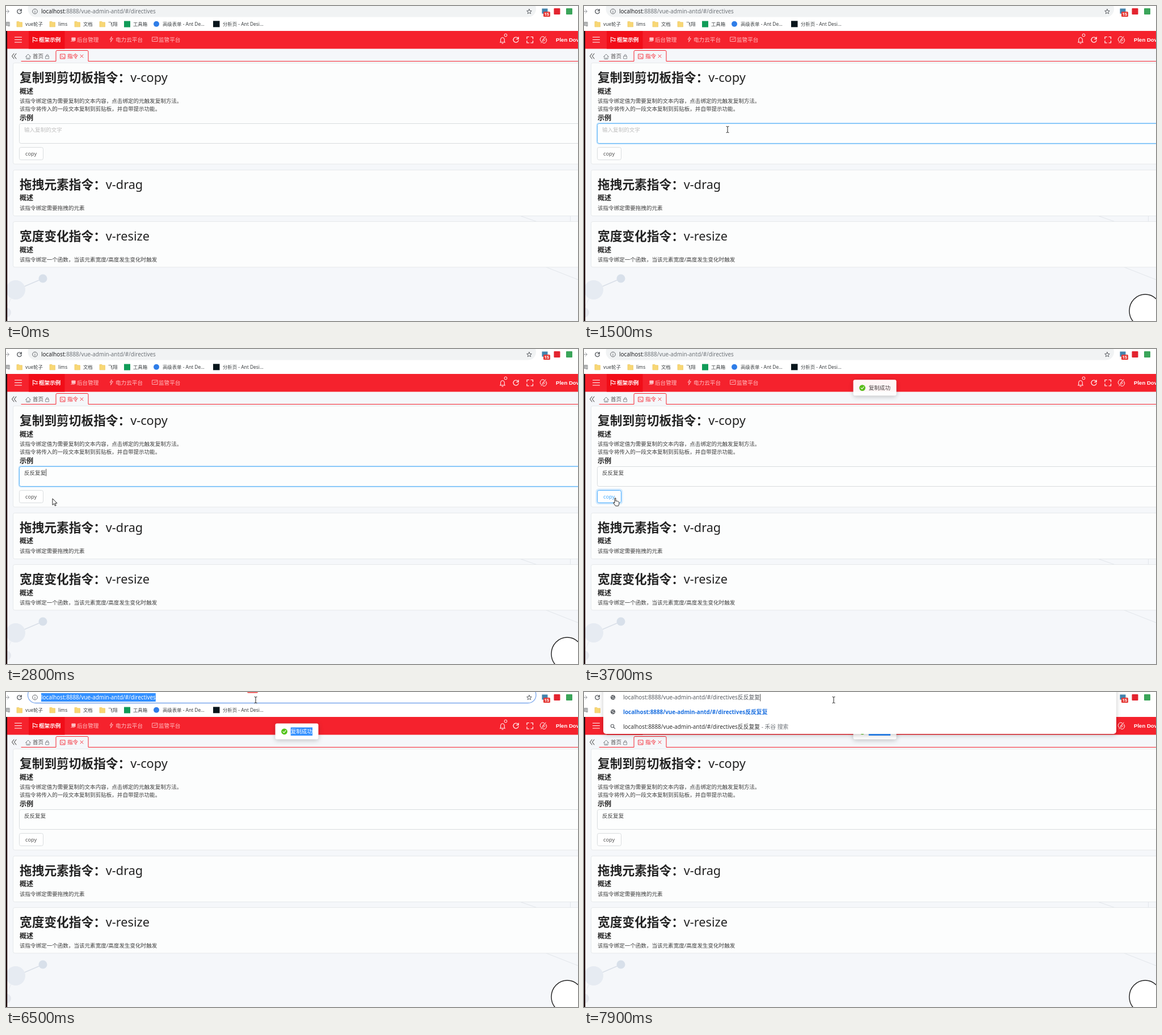
An HTML page for the animation above (8 s loop, 1008 by 556 pixels).

```html
<!DOCTYPE html>
<html lang="zh-CN">
<head>
<meta charset="utf-8">
<title>v-copy</title>
<style>
html, body { margin: 0; width: 100%; height: 100%; overflow: hidden; background: #fff; }
svg { display: block; width: 1008px; height: 556px; }
text { font-family: "Noto Sans", "Noto Sans CJK SC", "Noto Sans CJK", sans-serif; white-space: pre; }
.line { fill: none; stroke-linecap: round; stroke-linejoin: round; }
</style>
</head>
<body>
<svg id="stage" viewBox="0 0 1008 556" xmlns="http://www.w3.org/2000/svg"></svg>
<script>
const LOOP = 8000, STEP = 100;
const WORD = '反反复复', DONE = '复制成功', PATH = ':8888/vue-admin-antd/#/directives';
const BLUE = '#3390ff', RED = '#f5222d';

// Markup helpers; text is placed by its left edge and vertical middle.
const text = (x, cy, size, fill, str, more = '') =>
  `<text x="${x}" y="${cy + size * 0.37}" font-size="${size}" fill="${fill}" ${more}>${str}</text>`;
const rect = (x, y, w, h, fill, more = '') =>
  `<rect x="${x}" y="${y}" width="${w}" height="${h}" fill="${fill}" ${more}/>`;
const disc = (x, y, r, fill, more = '') => `<circle cx="${x}" cy="${y}" r="${r}" fill="${fill}" ${more}/>`;
const line = (d, color, w = 1, more = '') =>
  `<path class="line" d="${d}" stroke="${color}" stroke-width="${w}" ${more}/>`;
const group = (id, body) => `<g id="${id}">${body}</g>`;
const reload = (x, y, r, color, w) =>
  line(`M${x + r * 0.8} ${y - r * 0.6}A${r} ${r} 0 1 0 ${x + r} ${y + 1}M${x + r} ${y - r}v${r * 0.75}h${-r * 0.75}`, color, w);
const globe = (x, y) => disc(x, y, 4.2, '#5f6368') +
  line(`M${x - 2.5} ${y - 1.5}l2 1 1.5-2M${x - 1} ${y + 2.5}l1.5-1.5 2 .3`, '#fff', 1);

function browser() {
  const folder = x => `<path d="M${x} 27.5h4l1 1.3h4.5v8h-9.5z" fill="#f8d775" stroke="#e9c052" stroke-width=".6"/>`;
  const mark = (x, str) => text(x, 32, 8.4, '#3c4043', str);
  return rect(0, 0, 1008, 44, '#fff') +
    line('M0 9.5h5M2.5 6.5l3 3-3 3', '#9a9da1') + reload(23.5, 9.5, 3.8, '#5f6368', 1.4) +
    rect(38.5, -9, 895.5, 28.5, '#f1f3f4', 'rx="14" id="pill"') +
    group('address',
      disc(51, 9.5, 4.3, 'none', 'stroke="#5f6368"') + line('M51 9.3v2.3M51 7.3v.1', '#5f6368') +
      rect(62, 2, 203, 15, BLUE, 'id="urlMark"') +
      text(62, 9.5, 9.85, '#202124', `localhost<tspan id="urlPath" fill="#70757a">${PATH}</tspan>`, 'id="url"') +
      line('M266 4v12', '#222', 0.8, 'id="urlCaret"') +
      line('M922 5.5l1.2 2.9 3.1.2-2.4 2 .8 3-2.7-1.7-2.7 1.7.8-3-2.4-2 3.1-.2z', '#5f6368')) +
    rect(944.5, 4.5, 10, 9, '#4384ad') + rect(947, 10, 12, 9, '#e53935', 'rx="1.5"') +
    text(948.6, 14.6, 7.5, '#fff', '15', 'font-weight="600"') +
    rect(965.5, 4, 11, 11, '#e3242f', 'rx="1"') + rect(987, 4, 11, 11, '#3ba55a', 'rx="1"') +
    mark(-1, '用') + [19, 77, 121, 165].map(folder).join('') +
    mark(34, 'vue轮子') + mark(92, 'lims') + mark(136, '文档') + mark(180, '飞翔') +
    rect(208, 26.5, 11, 11, '#109c58') + mark(224, '工具箱') +
    disc(265, 31.7, 5, '#2f7de8') + mark(276, '高级表单 - Ant De...') +
    rect(365, 26.3, 11.5, 11, '#08151b') + mark(382, '分析页 - Ant Desi...');
}

function header() {
  const soft = '#ffc0c3', w = '#fff';
  const item = (x, str, color, more = '') => text(x, 59.5, 9.65, color, str, 'font-weight="500" ' + more);
  return rect(2, 44, 1006, 31.5, RED) + rect(40, 44, 63.5, 31.5, '#f10d18') +
    line('M15.5 55h12M15.5 59.5h12M15.5 64h12', w, 1.1) +
    line('M47.5 55v9M47.5 56h4v1.5h4l-1.5 2.2 1.5 2h-5v-1.3h-3', w) + item(58, '框架示例', w, 'style="font-weight:700"') +
    rect(115.5, 55.5, 7, 6, soft) + line('M114.5 62.5h6M115.5 57.5h7', soft, 0.7) + item(125, '后台管理', soft) +
    line('M186 54.5l-3 4.5h2.5l-1 4.5 4-6h-2.5z', soft, 0.9) + item(193, '电力云平台', soft) +
    line('M258 55h9v7.5h-9zM260 60l2-2 1.3 1 2.2-2.3', soft, 0.9) + item(269, '监管平台', soft) +
    line('M870.5 64h9M871.7 63.5v-4.5a3.3 3.3 0 0 1 6.6 0v4.5M874 66h2', w) +
    disc(880.5, 51.5, 2.4, RED, 'stroke="#fff" stroke-width="1"') +
    reload(898.5, 59.5, 4.6, w, 1.2) +
    line('M918 58v-3.5h3.5M925 54.5h3.5v3.5M928.500 61.500v3.500h-3.500M921.500 65h-3.500v-3.500', w, 1.2) +
    line('M943 65l8-11M948.500 55a4.600 5 0 0 0-6 7.500M951.500 57a4.600 5 0 0 1-6 7.500M945.500 60l3-3M947 62.500l3-3', w) +
    `<text x="969" y="63" font-size="9.6" fill="#fff" style="font-family:'Liberation Sans',sans-serif;font-weight:700">Plen Dovar</text>`;
}

function tabs() {
  const g = '#70757a';
  return line('M14 84l-3.500 4.500 3.500 4.500M18 84l-3.500 4.500 3.500 4.500', '#555', 1.1) +
    line('M27 97.500H88V80.500q0-2 2-2h53q2 0 2 2v17H1008', RED, 1) +
    line('M34.500 89.500l4.500-4.500 4.500 4.500M36 88.500v5h6v-5M39 93.500v-2.500', g, 0.9) +
    text(47, 88.3, 9.6, '#555', '首页') + line('M70 88.500h5.500v4.500h-5.500zM71.300 88.500v-1.500a1.500 1.500 0 0 1 3 0v1.500', g, 0.8) +
    line('M96 85h8v8h-8zM97.800 87.300l1.600 1.600-1.600 1.600M100.500 91h2', RED, 0.9) +
    text(108, 88.3, 9.6, RED, '指令', 'font-weight="500"') + line('M131 86l5 5M136 86l-5 5', RED, 0.9);
}

function page() {
  const card = (y, h) => rect(12.5, y, 1010, h, '#fcfdfd', 'rx="3" stroke="#e6e9eb"');
  const title = (cy, zh, en) => text(24, cy, 21.7, '#222',
    `<tspan font-weight="700">${zh}</tspan><tspan font-weight="500">${en}</tspan>`);
  const sub = (cy, str) => text(24, cy, 12.1, '#222', str, 'font-weight="700"');
  const body = (cy, str) => text(24, cy, 9.55, '#3f3f3f', str, 'font-weight="500"');
  return rect(0, 44, 1008, 512, '#f5f7fa') +
    line('M16 502L65 481', '#d9dfe8', 1.5) + line('M16 502L2 530', '#e7ebf1') +
    disc(17, 501, 17, '#e6ebf2') + disc(65, 481, 7.5, '#d8e0ea') + disc(0, 541, 9, '#e5e8ee') +
    line('M905 370l40 14M994.500 370v12M952 461l56 22', '#e2e6eb') +
    card(100.5, 178.5) + card(289.5, 81) + card(380.5, 80.5) +
    title(126, '复制到剪切板指令：', 'v-copy') + sub(150.5, '概述') +
    body(167, '该指令绑定值为需要复制的文本内容，点击绑定的元触发复制方法。') +
    body(181.5, '该指令将传入的一段文本复制到剪贴板，并自带提示功能。') + sub(198, '示例') +
    rect(22.5, 206.5, 1000, 37, 'none', 'rx="4" stroke="#1890ff" stroke-opacity=".2" stroke-width="2" id="glow"') +
    rect(23.5, 207.5, 1000, 35, '#fdfefe', 'rx="3" id="area"') +
    text(32, 218, 9.55, '#bfbfbf', '', 'id="entry" font-weight="500"') +
    line('M70.700 212v12', '#222', 0.8, 'id="caret"') +
    rect(22, 248, 45, 25, 'none', 'rx="4" stroke="#1890ff" stroke-width="3" id="wave"') +
    rect(23.5, 249.5, 42, 22, '#fff', 'rx="3" id="button"') +
    text(34, 260.5, 9.2, '#555', 'copy', 'id="copy"') +
    title(314.5, '拖拽元素指令：', 'v-drag') + sub(339, '概述') + body(356, '该指令绑定需要拖拽的元素') +
    title(406, '宽度变化指令：', 'v-resize') + sub(430.5, '概述') +
    body(447, '该指令绑定一个函数，当该元素宽度/高度发生变化时触发') +
    rect(0, 44, 2.2, 512, '#1a0508');
}

function overlays() {
  const shadow = 'style="filter:drop-shadow(0 2px 4px rgba(0,0,0,.22))"';
  const full = 'localhost' + PATH + WORD;
  return group('ime',
      rect(72, 232, 410, 46, '#fff', 'rx="4" stroke="#ead9da"') +
      text(84, 244, 9.5, '#555', "fan'fan'fu'fu") + text(84, 266, 9.5, '#333', '1.反反复复  2.反反  3.翻翻  4.返')) +
    group('mascot', '<ellipse cx="989" cy="538" rx="28" ry="29" fill="#fff" stroke="#222" stroke-width="1.4"/>') +
    group('toast',
      rect(474.5, 55.5, 76, 28, '#fff', `rx="3" ${shadow}`) + disc(490.5, 69.8, 5.4, '#52c41a') +
      line('M488 69.800l1.900 2 3.200-4', '#fff', 1.1) +
      rect(501.700, 62.5, 38.5, 14.5, BLUE, 'id="mark"') +
      text(501.7, 69.7, 9.6, '#444', `<tspan id="plain"></tspan><tspan id="chosen" fill="#fff"></tspan>`, 'font-weight="500"')) +
    rect(425, -4, 19, 6, '#f06a6a', 'rx="2" id="bar"') +
    group('popup',
      rect(34, -10, 904, 84, '#fff', `rx="5" ${shadow}`) +
      globe(51, 9.5) + text(69, 9.5, 9.85, '#5a5e63', full, 'id="typed"') +
      line('M311.500 4v12', '#222', 0.8, 'id="typedCaret"') +
      globe(51, 35) + text(69, 35, 9.85, '#1a6fe0', full, 'font-weight="600"') +
      disc(50, 60, 2.7, 'none', 'stroke="#5f6368" stroke-width="1.1"') + line('M52 62l2.700 2.700', '#5f6368', 1.2) +
      text(69, 61, 9.85, '#333', full + '<tspan fill="#70757a"> - 禾谷 搜索</tspan>')) +
    group('arrow', '<path d="M0 0v11.300l2.600-2.400 1.800 4 1.800-.8-1.800-3.900h3.600z" fill="#fff" stroke="#111" stroke-width=".9"/>') +
    group('beam', line('M-2-5.500q2 0 2 1q0-1 2-1M0-4.500v9M-2 5.500q2 0 2-1q0 1 2 1', '#222', 1)) +
    group('hand', '<path d="M-1 .5q1-1 2 0v5l1-.5 1.300.6 1.300.1 1.200.7 1 .8v3.500l-1.200 3.300h-5l-3.600-5q-.5-1.500 1-1.200l1 .9z" fill="#fff" stroke="#111" stroke-width=".9" stroke-linejoin="round"/>');
}

document.getElementById('stage').innerHTML = page() + browser() + header() + tabs() + overlays();
const el = Object.fromEntries([...document.querySelectorAll('[id]')].map(n => [n.id, n]));
const show = (node, on) => { node.style.display = on ? '' : 'none'; };
const set = (node, attrs) => { for (const k in attrs) node.setAttribute(k, attrs[k]); };
const ramp = (t, a, b) => Math.min(1, Math.max(0, (t - a) / (b - a)));

// Pointer route: time, x, y.
const route = [
  [100, 640, 47], [800, 253, 218], [2300, 253, 218], [2700, 82, 264], [2800, 82, 264],
  [3300, 55, 263], [3900, 55, 263], [4400, 495, 44], [4600, 512, 70], [4700, 512, 70],
  [4800, 543, 70], [5200, 513, 70], [5300, 513, 70], [5400, 507, 70], [5600, 503, 70],
  [5700, 503, 70], [6300, 440, 14], [LOOP, 440, 14]
];
function pointer(t) {
  const i = Math.max(1, route.findIndex(p => p[0] >= t));
  const [a, ax, ay] = route[i - 1], [b, bx, by] = route[i];
  const k = ramp(t, a, b), e = k * k * (3 - 2 * k);
  return [ax + (bx - ax) * e, ay + (by - ay) * e];
}
function pointerKind(x, y, t) {
  if (x > 23 && x < 66 && y > 249 && y < 272) return 'hand';
  const onArea = x > 23 && y > 207 && y < 242;
  const onToast = t > 3600 && x > 500 && x < 546 && y > 60 && y < 80;
  return onArea || onToast || y < 20 ? 'beam' : 'arrow';
}

function draw(t) {
  const [x, y] = pointer(t), kind = pointerKind(x, y, t);
  for (const k of ['arrow', 'beam', 'hand']) {
    show(el[k], t >= 100 && k === kind);
    set(el[k], { transform: `translate(${x} ${y})` });
  }

  const focus = ramp(t, 800, 1100) * (1 - ramp(t, 3400, 3700));
  const typed = t >= 2600;
  set(el.area, { stroke: focus > 0.3 ? '#56b1f5' : '#d9dcde' });
  set(el.glow, { opacity: focus });
  el.entry.textContent = typed ? WORD : '输入复制的文字';
  set(el.entry, { fill: typed ? '#444' : '#bfbfbf' });
  show(el.caret, typed && t < 3500 && (t - 2600) % 1000 < 500);
  show(el.ime, t >= 1900 && t < 2500);
  show(el.mascot, (t >= 900 && t < 3600) || t >= 6400);

  const hot = kind === 'hand';
  set(el.button, { stroke: hot ? '#40a9ff' : '#d9dcde' });
  set(el.copy, { fill: hot ? '#40a9ff' : '#555' });
  show(el.wave, t >= 3600 && t < 4000);
  set(el.wave, { opacity: 0.22 * (1 - ramp(t, 3600, 4000)) });

  show(el.toast, t >= 3700);
  set(el.toast, { transform: `translate(0 ${t < 3800 ? -1.2 : 0})`, opacity: t < 3800 ? 0.96 : 1 });
  const from = t < 4800 ? 4 : Math.min(4, Math.max(0, Math.round((pointer(Math.min(t, 5600))[0] - 501.7) / 9.6)));
  el.plain.textContent = DONE.slice(0, from);
  el.chosen.textContent = DONE.slice(from);
  set(el.mark, { x: 501.7 + 9.6 * from, width: 9.6 * (4 - from) });

  const editing = t >= 6400, all = editing && t < 7000;
  set(el.pill, editing
    ? { fill: '#fff', stroke: '#7aa7ec', 'stroke-width': 1.3 }
    : { fill: '#f1f3f4', stroke: 'none' });
  show(el.urlMark, all);
  set(el.url, { fill: all ? '#fff' : '#202124' });
  set(el.urlPath, { fill: all ? '#fff' : '#70757a' });
  show(el.urlCaret, t >= 7000 && t < 7600);
  show(el.bar, t >= 6200);
  show(el.popup, t >= 7800);
  if (t >= 6400) {
    const w = el.url.getComputedTextLength();
    set(el.urlMark, { width: w });
    set(el.urlCaret, { transform: `translate(${w - 203.5} 0)` });
  }
  if (t >= 7800) set(el.typedCaret, { transform: `translate(${el.typed.getComputedTextLength() - 242} 0)` });
}

const start = performance.now();
function tick() {
  const t = (performance.now() - start) % LOOP;
  draw(Math.floor(t / STEP) * STEP);
  // The pointer stays above the suggestions.
  requestAnimationFrame(tick);
}
tick();
</script>
</body>
</html>
```
